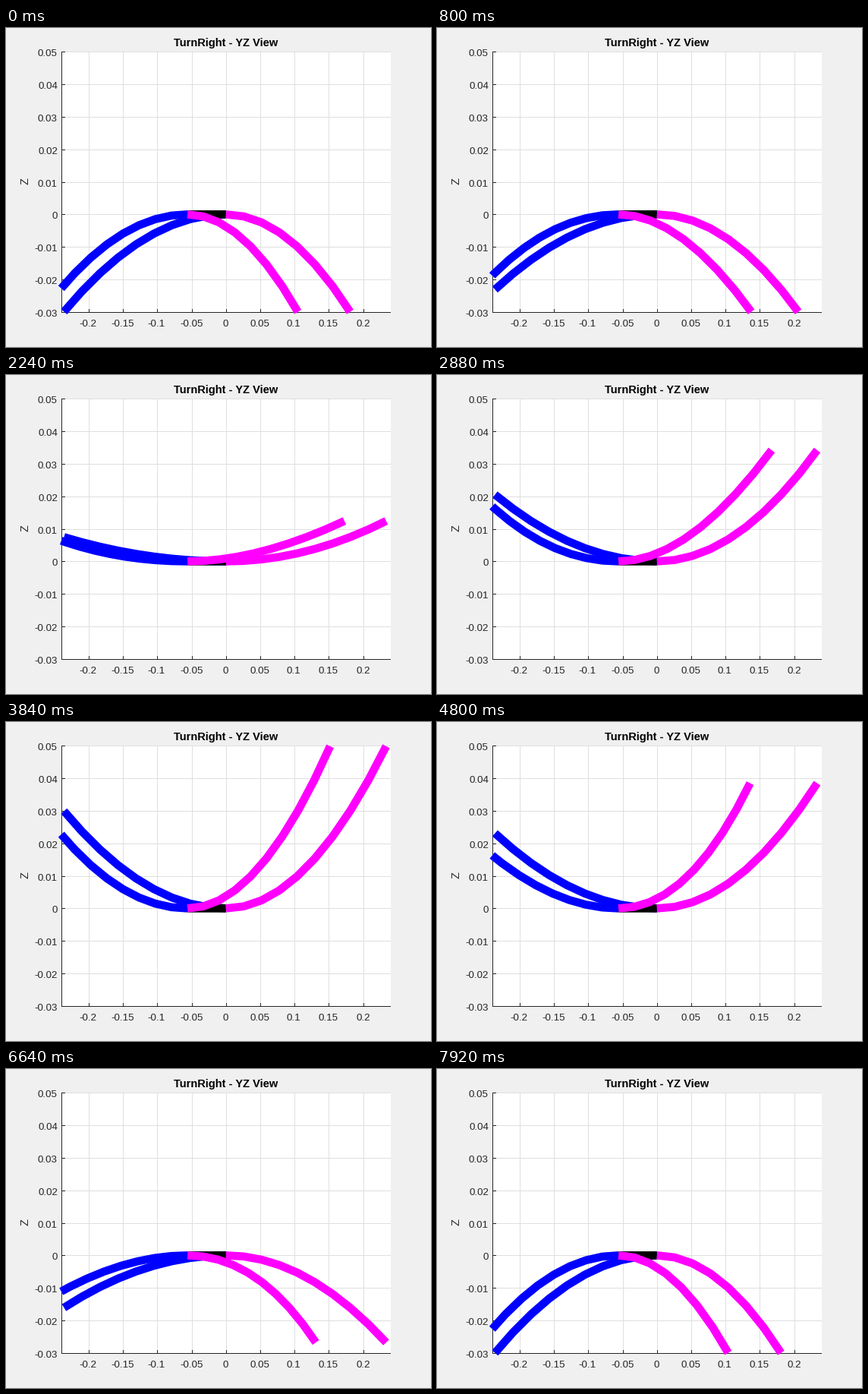
These frames come from a looping animation (560x420 px, 8 s). A matplotlib script:

```python
import numpy as np
import matplotlib.pyplot as plt
from matplotlib.animation import FuncAnimation
from matplotlib.patches import Rectangle

W, H, DPI = 560, 420, 96
FRAMES, INTERVAL = 100, 80
Y_MIN, Z_MIN, Z_MAX = -0.24, -0.03, 0.05
BODY = -0.056           # left edge of the body
INK, GRID = "#262626", "#dfdfdf"

plt.rcParams["font.family"] = "Liberation Sans"


def px(y):
    return 289.8 + 904.2 * np.asarray(y)


def py(z):
    return 31.45 + (Z_MAX - np.asarray(z)) * 4279


def snap(v):
    """Centre of the pixel that a hairline at v falls on."""
    return np.round(v) + 0.5


fig = plt.figure(figsize=(W / DPI, H / DPI), dpi=DPI, facecolor="#f0f0f0")
ax = fig.add_axes([0, 0, 1, 1])
ax.set_xlim(0, W)
ax.set_ylim(H, 0)
ax.axis("off")

LEFT, RIGHT, TOP, BOTTOM = 73.5, 506.5, 31.5, 374.5


def rule(x0, y0, x1, y1, color, z):
    ax.plot([x0, x1], [y0, y1], color=color, lw=0.75, zorder=z,
            solid_capstyle="projecting", snap=False)


def label(x, y, text, size=10, color=INK, **kw):
    kw.setdefault("va", "baseline")
    kw.setdefault("ha", "center")
    ax.text(x, y, text, fontsize=size, color=color, **kw)


ax.add_patch(Rectangle((73, 31), 434, 344, color="white", lw=0, zorder=0))

for i in range(-4, 5):
    v = i * 0.05
    x = snap(px(v))
    rule(x, TOP, x, BOTTOM, GRID, 1)
    rule(x, BOTTOM, x, BOTTOM - 4, INK, 2)
    label(x - 1.2, 393, f"{v:.2g}" if i else "0")

for i in range(-3, 6):
    v = i * 0.01
    y = snap(py(v))
    rule(LEFT, y, RIGHT, y, GRID, 1)
    rule(LEFT, y, LEFT + 4, y, INK, 2)
    label(68, y + 5.5, f"{v:.2f}" if i else "0", ha="right")

rule(LEFT, TOP, LEFT, BOTTOM, INK, 2)
rule(LEFT, BOTTOM, RIGHT, BOTTOM, INK, 2)
label(289.5, 24, "TurnRight - YZ View", 11, "black", weight="bold")
label(25.7, 201.7, "Z", 11, rotation=90, va="center")


def limb(color, z):
    return ax.plot([], [], color=color, lw=8, zorder=z, clip_on=False,
                   snap=False, solid_capstyle="butt",
                   solid_joinstyle="miter")[0]


# root, span, sway of the tip, flap height, line
FINS = [
    (0.0, -0.236, 0.0, 0.03, limb("blue", 3)),
    (BODY, -0.212, 0.014, 0.03, limb("blue", 3.1)),
    (0.0, 0.2335, 0.0, 0.05, limb("magenta", 5)),
    (BODY, 0.2064, 0.023, 0.05, limb("magenta", 5.1)),
]
limb("black", 4).set_data(px([BODY, 0]), py([0, 0]))

S = np.linspace(0, 1, 10)


def cut(a, b, low):
    """End the polyline where a first drops below low."""
    out = np.flatnonzero(a < low - 1e-9)
    if not out.size:
        return a, b
    i = out[0]
    f = (low - a[i - 1]) / (a[i] - a[i - 1])
    end = b[i - 1] + f * (b[i] - b[i - 1])
    return np.append(a[:i], low), np.append(b[:i], end)


def draw(n):
    phase = 2 * np.pi * (n + 1) / FRAMES
    for root, span, sway, flap, line in FINS:
        y = root + span * S + sway * np.sin(phase) * S**2
        z = -flap * np.cos(phase) * S**2
        y, z = cut(y, z, Y_MIN)
        z, y = cut(z, y, Z_MIN)
        line.set_data(px(y), py(z))
    return [fin[-1] for fin in FINS]


anim = FuncAnimation(fig, draw, frames=FRAMES, interval=INTERVAL,
                     repeat=True, repeat_delay=0, blit=False)
plt.show()
```
